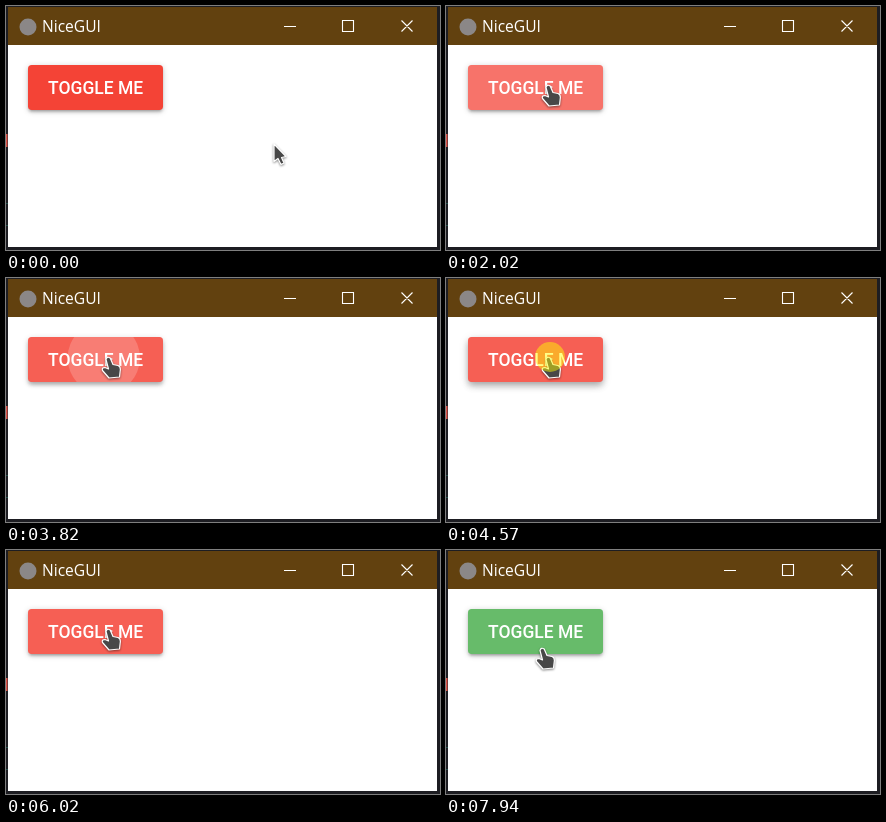
Animation of 434 by 244 pixels, one loop 8000 ms. Source, as an HTML page:

```html
<!DOCTYPE html>
<html lang="en">
<head>
<meta charset="utf-8">
<title>Toggle button</title>
<style>
  html, body { margin: 0; width: 100%; height: 100%; overflow: hidden; background: #fff; }
  svg { position: absolute; left: 0; top: 0; }
  #btn { position: absolute; left: 22px; top: 59px; width: 135px; height: 45px; border-radius: 3.75px; }
  .title { font: 15.6px "Open Sans", "Noto Sans", sans-serif; fill: #fff; }
  .label { font: 500 17.5px Roboto, sans-serif; fill: #fff; }
</style>
</head>
<body>
<div id="btn"></div>
<svg width="434" height="244" viewBox="0 0 434 244">
  <defs><clipPath id="clip"><rect x="22" y="59" width="135" height="45" rx="3.75"/></clipPath></defs>
  <path d="M0 0H434V244H0ZM2 39V241H431V39Z" fill="#1d1d22" fill-rule="evenodd"/>
  <rect x="2" y="1" width="429" height="38" fill="#62410f"/>
  <rect y="128" width="1.5" height="13" fill="#e0574c"/>
  <path d="M0 197.5H2M0 219.5H2" stroke="#24504a"/>
  <circle cx="22" cy="21" r="8.5" fill="#8b8787"/>
  <text class="title" x="36" y="26">NiceGUI</text>
  <path d="M278 20.5H290M336.5 14.5H347.5V25.5H336.5ZM395.5 14.5L406.5 25.5M406.5 14.5L395.5 25.5" fill="none" stroke="#fff" stroke-width="1.1"/>
  <g clip-path="url(#clip)" fill="#fff">
    <rect id="hover" x="22" y="59" width="135" height="45"/>
  </g>
  <text class="label" x="42" y="88">TOGGLE ME</text>
  <g id="ripples" clip-path="url(#clip)" fill="#fff"></g>
  <g id="cursor" fill="#484848" stroke="#fff" stroke-width="1.2" stroke-linejoin="round" style="filter:drop-shadow(.5px 1px 1px #0007)">
    <path id="arrow" d="M0 0V17.5L4 14.5L7 20.5L10 19L7.5 13.5L12 12.5Z"/>
    <path id="hand" d="M-3 2.5Q-2-1 1.2 1L4 7.5L9 8.5Q12 9.5 11.2 14L10.5 20L0 21L-6.5 13.5Q-7.5 10.5-4 10.5L-.5 12Z"/>
  </g>
  <circle id="spot" r="15" fill="#ff0" fill-opacity=".47"/>
</svg>
<script>
const LOOP = 8000;
const RED = '#f44336', GREEN = '#4caf50';
// [press, release] of the mouse button
const clicks = [[1180, 1465], [1570, 1645], [2560, 2688], [3540, 3702], [4490, 4605], [5330, 5465], [7170, 7365]];
// [enter, leave] of the pointer over the button
const hovers = [[710, 6410], [6710, 1e9]];
const $ = id => document.getElementById(id);
const clamp = v => Math.min(1, Math.max(0, v));
const mix = (a, b, k) => a + (b - a) * k;

// CSS-style cubic bezier, solved by bisection
function bezier(x1, y1, x2, y2) {
  const at = (a, b, s) => 3 * a * s * (1 - s) ** 2 + 3 * b * s * s * (1 - s) + s ** 3;
  return v => {
    v = clamp(v);
    if (v === 0 || v === 1) return v;
    let lo = 0, hi = 1;
    for (let i = 0; i < 22; i++) {
      const mid = (lo + hi) / 2;
      if (at(x1, x2, mid) < v) lo = mid; else hi = mid;
    }
    return at(y1, y2, lo);
  };
}
const soft = bezier(.25, .8, .5, 1);
const standard = bezier(.4, 0, .2, 1);
const glide = bezier(.42, 0, .58, 1);

// Rises after `on`, falls back after `off`
function pulse(t, on, off, time) {
  if (t < on) return 0;
  const up = soft((Math.min(t, off) - on) / time);
  return t < off ? up : up * (1 - soft((t - off) / time));
}
const strongest = (list, t, time) => Math.max(...list.map(([on, off]) => pulse(t, on, off, time)));

function pointer(t) {
  if (t < 6340) {
    const k = glide((t - 360) / 590), j = 1 - k;
    return [j * j * 268 + 2 * j * k * 190 + k * k * 103, j * j * 138 + 2 * j * k * 100 + k * k * 79];
  }
  if (t < 6550) {
    const k = glide((t - 6340) / 210);
    return [mix(103, 97, k), mix(79, 131, k)];
  }
  return [97, mix(131, 98, glide((t - 6550) / 260))];
}

// Resting and pressed shadows: y, blur, spread, alpha
const shadows = [
  [[1, 5, 0, .2], [3, 5, -1, .2]],
  [[2, 2, 0, .14], [5, 8, 0, .14]],
  [[3, 1, -2, .12], [1, 14, 0, .12]]
];
function shadow(k) {
  return shadows.map(([a, b]) => {
    const [y, blur, spread, alpha] = a.map((v, i) => mix(v, b[i], k));
    return `0 ${y * 1.25}px ${blur * 1.25}px ${spread * 1.25}px rgba(0,0,0,${alpha})`;
  }).join();
}

const rings = clicks.map(() => {
  const ring = document.createElementNS('http://www.w3.org/2000/svg', 'circle');
  return $('ripples').appendChild(ring);
});

function drawRipple(ring, t, release) {
  const age = t - release - 50;
  const live = age >= 0 && age < 525;
  ring.style.display = live ? '' : 'none';
  if (!live) return;
  const k = standard(age / 225);
  const [x, y] = pointer(release);
  ring.setAttribute('cx', mix(x, 89.5, k));
  ring.setAttribute('cy', mix(y, 81.5, k));
  ring.setAttribute('r', 71.2 * mix(.2, 1, k));
  ring.style.opacity = .2 * standard(age / 100) * (1 - standard((age - 250) / 250));
}

function render(t) {
  const toggles = clicks.filter(c => t >= c[1] + 30).length;
  $('btn').style.background = toggles % 2 ? GREEN : RED;
  $('btn').style.boxShadow = shadow(strongest(clicks, t, 300));
  $('hover').style.opacity = .15 * strongest(hovers, t, 400);
  rings.forEach((ring, i) => drawRipple(ring, t, clicks[i][1]));

  const [x, y] = pointer(t);
  const over = hovers.some(([a, b]) => t >= a && t < b);
  $('cursor').setAttribute('transform', `translate(${x} ${y})`);
  $('hand').style.display = over ? '' : 'none';
  $('arrow').style.display = over ? 'none' : '';
  $('spot').setAttribute('cx', x + 1);
  $('spot').setAttribute('cy', y);
  $('spot').style.display = clicks.some(([a, b]) => t >= a && t < b) ? '' : 'none';
}

const start = performance.now();
function tick() {
  render((performance.now() - start) % LOOP);
  requestAnimationFrame(tick);
}
tick();
</script>
</body>
</html>
```
